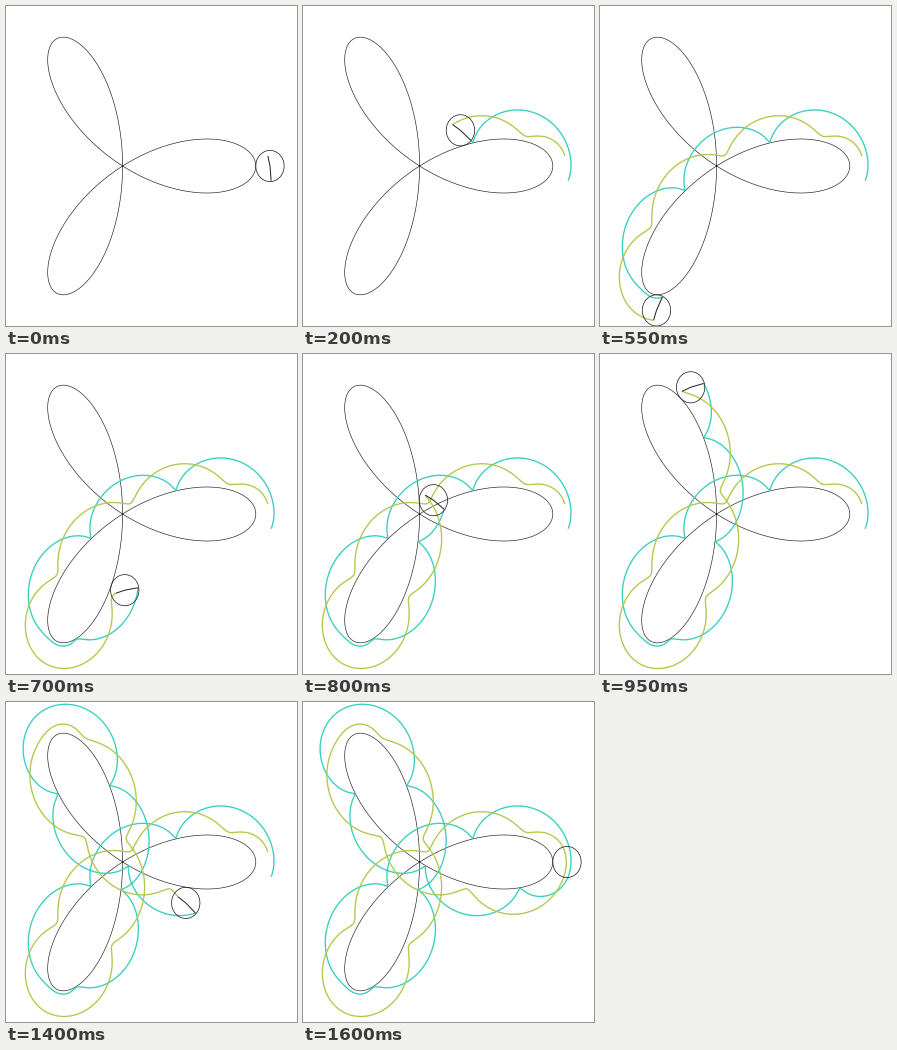
Recreate the animation shown at these times as a matplotlib script. Size 291x320 px, loop 2300 ms.

```python
import numpy as np
import matplotlib.pyplot as plt
from matplotlib.animation import FuncAnimation

W, H, DPI = 291, 320, 100
INTERVAL, FRAMES = 50, 46
CX, CY = 116.6, 160.0          # rose centre on the stage
SX, SY = 133.2, 146.4          # pixels per unit
STEP = 0.1                     # polar angle gained per frame, in radians
ROLLS = 10                     # turns of the wheel in one trip
INK, CYAN, LIME = "#222222", "#3acfc0", "#b5c74c"

# Rose r = cos(3 theta) with its arc length
theta = np.linspace(0, np.pi, 3201)
speed = np.sqrt(1 + 8 * np.sin(3 * theta) ** 2)
arc = np.concatenate(([0], np.cumsum((speed[1:] + speed[:-1]) / 2 * np.diff(theta))))
radius = arc[-1] / (2 * np.pi * ROLLS)
rose = np.cos(3 * theta) * np.exp(1j * theta)

# Wheel centre rides on the outer normal; the pens turn with the arc length
tangent = (-3 * np.sin(3 * theta) + 1j * np.cos(3 * theta)) * np.exp(1j * theta)
hub = rose - 1j * radius * tangent / speed


def pen(reach, start_deg):
    return hub + reach * radius * np.exp(1j * (np.radians(start_deg) + arc / radius))


cyan_pen = pen(0.95, -85)
lime_pen = pen(0.665, 103)
rim = radius * np.exp(1j * np.linspace(0, 2 * np.pi, 121))


def to_stage(z):
    z = np.asarray(z)
    return CX + SX * z.real, CY - SY * z.imag


fig = plt.figure(figsize=(W / DPI, H / DPI), dpi=DPI, facecolor="white")
ax = fig.add_axes([0, 0, 1, 1])
ax.set_xlim(0, W)
ax.set_ylim(H, 0)
ax.axis("off")


def stroke(color, px, z=()):
    points = to_stage(z) if len(z) else ([], [])
    return ax.plot(*points, color=color, lw=px * 72 / DPI,
                   solid_joinstyle="round", solid_capstyle="butt")[0]


stroke(INK, 0.65, rose)
cyan_line = stroke(CYAN, 1.35)
lime_line = stroke(LIME, 1.35)
wheel = stroke(INK, 0.75)
rod = stroke(INK, 1.0)


def update(frame):
    angle = min(frame * STEP, np.pi)
    i = int(round(angle / np.pi * (len(theta) - 1)))
    trail = slice(0, i + 1 if i else 0)
    cyan_line.set_data(*to_stage(cyan_pen[trail]))
    lime_line.set_data(*to_stage(lime_pen[trail]))
    wheel.set_data(*to_stage(hub[i] + rim))
    rod.set_data(*to_stage([lime_pen[i], hub[i], cyan_pen[i]]))
    rod.set_visible(angle < np.pi)
    return cyan_line, lime_line, wheel, rod


anim = FuncAnimation(fig, update, frames=FRAMES, interval=INTERVAL,
                     repeat=True, repeat_delay=0, blit=False)
plt.show()
```
